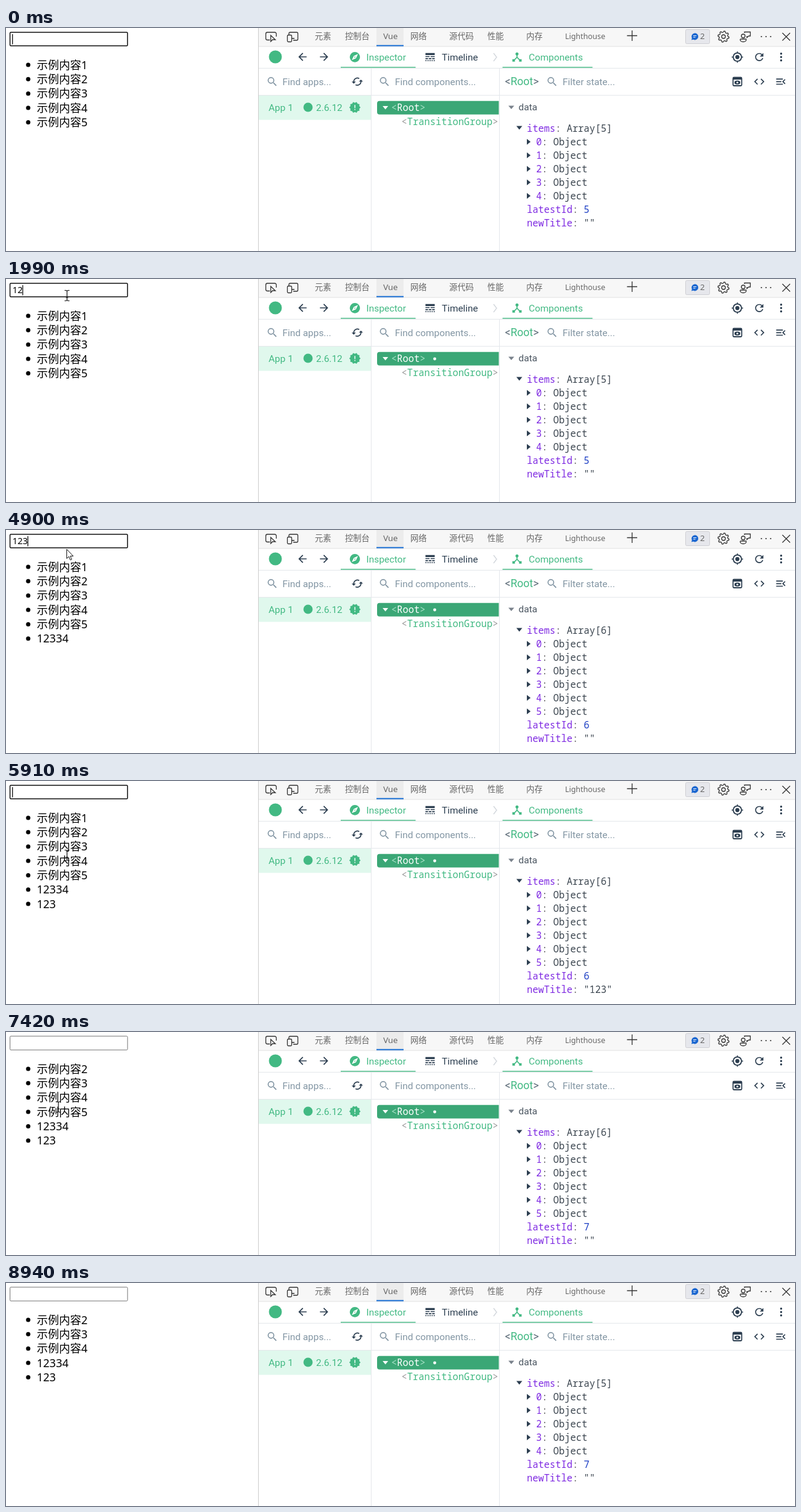
Recreate the animation shown at these times as an HTML page. Size 1280 by 363 pixels, loop 9.05 s.

```html
<!DOCTYPE html>
<html lang="zh">
<head>
<meta charset="utf-8">
<title>List transition</title>
<style>
html, body { margin: 0; width: 100%; height: 100%; overflow: hidden; background: #fff; }
svg { display: block; }
text { font-family: Roboto, sans-serif; font-size: 15.4px; }
.ui text { font-family: "Noto Sans", "Noto Sans CJK SC", sans-serif; font-size: 13.3px; fill: #666; }
.page text { font-family: "Noto Sans", "Noto Sans CJK SC", sans-serif; font-size: 18px; }
.page #typed { font-size: 14.5px; }
.mono text { font-family: "Noto Sans Mono", monospace; }
.line { fill: none; stroke: #333; stroke-width: 1.3; }
.key { fill: #7f2be2; }
.dim { fill: #666; }
</style>
</head>
<body>
<svg id="stage" width="1280" height="363" viewBox="0 0 1280 363">
  <g class="page">
    <rect id="field" fill="#fff" rx="1.5"/>
    <text id="typed" x="10.5" y="22.8"></text>
    <rect id="caret" y="10" width="1.2" height="16.5"/>
    <g id="list"></g>
  </g>

  <rect x="409" width="871" height="363" fill="#fff"/>
  <rect x="409" width="871" height="30" fill="#f7f7f7"/>
  <rect x="601" width="44" height="30" fill="#ececec"/>
  <path d="M409 30H1280" stroke="#e0e0e0"/>
  <path d="M409.5 0V363" stroke="#ccc"/>
  <path d="M410 65.5H1280M410 109.5H1280M592.5 66V363M800.5 66V363" stroke="#e4e7eb"/>
  <rect x="601" y="27.7" width="44" height="2" fill="#1a6fd4"/>
  <path d="M543 64H664.5M805.500 64H951.500" stroke="#7acda7" stroke-width="2.2"/>
  <rect x="410" y="110" width="182" height="39.5" fill="#e0f8ed"/>
  <path d="M799.500 118.700H606a4 4 0 0 0-4 4V136.700a4 4 0 0 0 4 4H799.500z" fill="#3ba776"/>

  <g class="ui" id="tabs">
    <path class="line" d="M428 19.500H424a2.500 2.500 0 0 1-2.500-2.500V9.500a2.500 2.500 0 0 1 2.500-2.500H436a2.500 2.500 0 0 1 2.500 2.500V14M429.500 12V22L432.500 19H437z"/>
    <path class="line" d="M459 12V9a2 2 0 0 1 2-2H471.500a2 2 0 0 1 2 2V18a2 2 0 0 1-2 2H466M464 17H468"/>
    <rect class="line" x="456.500" y="11.500" width="7" height="11" rx="1.500"/>
    <path class="line" d="M1007.500 12.500H1024M1015.700 4V21"/>
    <rect x="1102.500" y="2.500" width="39" height="23" rx="2" fill="#e6e7ec" stroke="#cfcfd4"/>
    <path d="M1112 19.500L1112.800 16.500A5.500 5.500 0 1 1 1115 18.700z" fill="#1a66d0"/>
    <path d="M1115 12.500H1120M1115 15H1118.500" stroke="#fff"/>
    <path id="gear" class="line"/><circle class="line" cx="1164" cy="14" r="3"/>
    <circle class="line" cx="1196" cy="13" r="3"/>
    <path class="line" d="M1191 19Q1191 18 1192.500 18H1199.500Q1201 18 1201 19Q1200.500 22.500 1196 22.500T1191 19M1198 8V6.500H1207.500V13H1205L1202 15.500V13"/>
    <path d="M1225.500 14h.01M1233 14h.01M1240.500 14h.01" stroke="#333" stroke-width="2.200" stroke-linecap="round"/>
    <path class="line" d="M1259.500 8L1272 20.500M1272 8L1259.500 20.500"/>
  </g>

  <g id="tools">
    <circle cx="437" cy="47" r="10.500" fill="#42b983"/>
    <circle cx="490" cy="129" r="7.500" fill="#42b983"/>
    <path d="M791 41L796 47.500L791 54" fill="none" stroke="#d0d5da" stroke-width="1.300"/>
    <path d="M1257.500 41.800h.01M1257.500 47.300h.01M1257.500 52.800h.01" stroke="#2c3e50" stroke-width="3.400" stroke-linecap="round"/>
    <rect x="1179.500" y="80.500" width="14" height="13.500" rx="1.500" fill="none" stroke="#2c3e50" stroke-width="1.800"/>
    <path d="M1179 82.500H1194" stroke="#2c3e50" stroke-width="3"/>
    <ellipse cx="1186.500" cy="88.700" rx="4.700" ry="3.200" fill="#2c3e50"/>
    <circle cx="1186.500" cy="88.700" r="1.500" fill="#fff"/>
    <path d="M611 127h9l-4.500 5.500z" fill="#fff"/>
    <path d="M815 126.500h9.500l-4.750 5.500z" fill="#7a828c"/>
    <path d="M828 159.500h9.500l-4.750 6z" fill="#2c3e50"/>
  </g>

  <g class="mono">
    <text x="625" y="135.200" fill="#a9e2c8">&lt;<tspan fill="#fff" font-weight="500">Root</tspan>&gt;</text>
    <text x="641.500" y="157.800" fill="#999">&lt;<tspan fill="#42b983">TransitionGroup</tspan>&gt;</text>
    <circle id="dot" cx="695.500" cy="130" r="2.400" fill="#fff"/>
    <g id="data"></g>
  </g>

  <path id="beam" d="M-4 -8.500H-1.500L0 -7.500L1.500 -8.500H4M0 -7.500V7.500M-4 8.500H-1.500L0 7.500L1.500 8.500H4M-2 3H2" fill="none" stroke="#111" stroke-width="1.200"/>
  <path id="arrow" d="M.5 .5V15.500L4 12.300L6.300 18L8.600 17L6.300 11.600H11z" fill="#fff" stroke="#111"/>
</svg>

<script>
const LOOP = 9050, PITCH = 23.35, MOVE = 500;
const $ = id => document.getElementById(id);
const esc = s => s.replace(/</g, '&lt;').replace(/>/g, '&gt;');
const label = (x, y, s, fill = '#2c3e50', more = '') =>
  `<text x="${x}" y="${y}" fill="${fill}" ${more}>${esc(s)}</text>`;

// Static toolbar
const glyphs = {
  back: 'M20 11H7.83l5.59-5.59L12 4l-8 8 8 8 1.41-1.41L7.83 13H20z',
  next: 'M4 11H16.17l-5.59-5.59L12 4l8 8-8 8-1.41-1.41L16.17 13H4z',
  search: 'M15.5 14h-.79l-.28-.27A6.47 6.47 0 0 0 16 9.5 6.5 6.5 0 1 0 9.5 16c1.61 0 3.09-.59 4.23-1.57l.27.28v.79l5 4.99L20.49 19zm-6 0A4.5 4.5 0 1 1 14 9.5 4.5 4.5 0 0 1 9.5 14z',
  compass: 'M12 2a10 10 0 1 0 0 20 10 10 0 0 0 0-20zm2.19 12.19L6 18l3.81-8.19L18 6zM12 10.9a1.1 1.1 0 1 1 0 2.2 1.1 1.1 0 0 1 0-2.2z',
  lines: 'M3 16h5v-2H3zm6.5 0h5v-2h-5zm6.5 0h5v-2h-5zM3 20h2v-2H3zm4 0h2v-2H7zm4 0h2v-2h-2zm4 0h2v-2h-2zm4 0h2v-2h-2zM3 12h8v-2H3zm10 0h8v-2h-8zM3 4v4h18V4z',
  hub: 'M17 16l-4-4V8.82A3 3 0 1 0 11 8.82V12l-4 4H3v5h5v-3.05l4-4.2 4 4.2V21h5v-5z',
  seal: 'M23 12l-2.44-2.78.34-3.68-3.61-.82-1.89-3.18L12 3 8.6 1.54 6.71 4.72l-3.61.81.34 3.68L1 12l2.44 2.78-.34 3.69 3.61.82 1.89 3.18L12 21l3.4 1.46 1.89-3.18 3.61-.82-.34-3.68zm-10 5h-2v-2h2zm0-4h-2V7h2z',
  target: 'M12 8a4 4 0 1 0 0 8 4 4 0 0 0 0-8zm8.94 3A9 9 0 0 0 13 3.06V1h-2v2.06A9 9 0 0 0 3.06 11H1v2h2.06A9 9 0 0 0 11 20.94V23h2v-2.06A9 9 0 0 0 20.94 13H23v-2zM12 19a7 7 0 1 1 0-14 7 7 0 0 1 0 14z',
  reload: 'M17.65 6.35C16.2 4.9 14.21 4 12 4a8 8 0 0 0 0 16c3.73 0 6.84-2.55 7.73-6h-2.08A6 6 0 0 1 12 18a6 6 0 1 1 0-12c1.66 0 3.14.69 4.22 1.78L13 11h7V4z',
  sync: 'M19 8l-4 4h3a6 6 0 0 1-8.8 5.25l-1.46 1.46A8 8 0 0 0 20 12h3zM6 12a6 6 0 0 1 8.8-5.25l1.46-1.46A8 8 0 0 0 4 12H1l4 4 4-4z',
  code: 'M9.4 16.6L4.8 12l4.6-4.6L8 6l-6 6 6 6zm5.2 0l4.6-4.6-4.6-4.6L16 6l6 6-6 6z',
  menu: 'M3 18h13v-2H3zm0-5h10v-2H3zm0-7v2h13V6zm18 9.59L17.42 12 21 8.41 19.59 7l-5 5 5 5z'
};
const icon = (name, x, y, fill = '#2c3e50', size = 20) =>
  `<path d="${glyphs[name]}" fill="${fill}" fill-rule="evenodd" transform="translate(${x} ${y}) scale(${size / 24}) translate(-12 -12)"/>`;

const star = (cx, cy, n, a, b) => 'M' + Array.from({length: n * 4}, (_, i) => {
  const r = i % 4 < 2 ? a : b, w = (i + .5) * Math.PI / n / 2;
  return `${cx + r * Math.sin(w)} ${cy - r * Math.cos(w)}`;
}).join('L') + 'z';
$('gear').setAttribute('d', star(1164, 14, 8, 9, 7));

const green = '#42b983', gray = '#8295a3';
$('tabs').innerHTML += [
  [501, '元素'], [550, '控制台'], [612, 'Vue'], [656, '网络'], [719, '源代码'],
  [781, '性能'], [844, '内存'], [1126, '2']
].map(([x, s]) => label(x, 18.3, s)).join('') + label(907, 18.3, 'Lighthouse', '#666', 'style="font-size:12.4px"');

$('tools').innerHTML +=
  icon('back', 481, 47) + icon('next', 516, 47) + icon('compass', 566, 47.3) .replace('#2c3e50', green) +
  icon('lines', 688, 47.3) + icon('hub', 829, 47.3, green) + icon('seal', 566, 129.3, green) +
  icon('target', 1186.5, 47.3) + icon('reload', 1222, 47.3) +
  [432, 614, 886].map(x => icon('search', x, 87.3, gray)).join('') +
  icon('sync', 570, 87.3) + icon('code', 1222, 87.3) + icon('menu', 1257, 87.3) +
  label(584.5, 52.8, 'Inspector', green) + label(707, 52.8, 'Timeline') + label(848, 52.8, 'Components', green) +
  label(448.5, 92.8, 'Find apps...', gray) + label(631, 92.8, 'Find components...', gray) + label(903, 92.8, 'Filter state...', gray) +
  label(426, 134.6, 'App 1', green) + label(503, 134.6, '2.6.12', green) + label(831.5, 134.3, 'data', '#4b5661') +
  `<text x="809.5" y="93.3" fill="#606f7b" style="font-size:17.6px">&lt;<tspan fill="${green}">Root</tspan>&gt;</text>`;

// Timeline
const at = (steps, t) => steps.filter(s => s[0] <= t).pop();
const typing = [[0, ''], [1790, '1'], [1980, '12'], [2190, '123'], [2290, '1233'], [2490, '12334'],
  [3090, ''], [4490, '1'], [4700, '123'], [5400, '']];
const states = [[0, 5, 5, ''], [2990, 5, 5, '12334'], [3580, 6, 6, ''], [5200, 6, 6, '123'],
  [6010, 7, 7, ''], [7320, 6, 7, ''], [8230, 5, 7, '']];
const path = [[100, 388, 246], [980, 99, 27], [3690, 99, 27], [3790, 99, 32], [4890, 98, 31], [4990, 99, 27],
  [5400, 99, 27], [5900, 99, 121], [6310, 99, 121], [6800, 97, 70], [7120, 97, 70], [7410, 85, 122],
  [7950, 85, 122], [8350, 300, 375]];
const rows = [
  ...[1, 2, 3, 4, 5].map(n => ({name: '示例内容' + n, enter: -MOVE, leave: Infinity})),
  {name: '12334', enter: 3080, leave: Infinity}, {name: '123', enter: 5400, leave: Infinity}
];
const blur = 6773;
rows[0].leave = blur;
rows[4].leave = 7720;

// CSS "ease": cubic-bezier(.25, .1, .25, 1)
function ease(x) {
  if (x <= 0) return 0;
  if (x >= 1) return 1;
  const bez = (a, b, u) => 3 * a * u * (1 - u) ** 2 + 3 * b * u * u * (1 - u) + u ** 3;
  let lo = 0, hi = 1;
  for (let i = 0; i < 20; i++) {
    const mid = (lo + hi) / 2;
    if (bez(.25, .25, mid) < x) lo = mid; else hi = mid;
  }
  return bez(.1, 1, lo);
}

function drawInput(t) {
  const focus = t < blur, text = at(typing, t)[1];
  const box = focus ? {x: 6.5, y: 7, width: 190.7, height: 22, stroke: '#101010', 'stroke-width': 1.5}
    : {x: 6.5, y: 6.8, width: 190.7, height: 22.4, stroke: '#767676', 'stroke-width': 1};
  for (const k in box) $('field').setAttribute(k, box[k]);
  $('typed').textContent = text;
  const key = at(typing.filter(s => s[1]), t);
  const on = Math.floor((t - (key ? key[0] : -20)) / 500) % 2 == 0;
  $('caret').setAttribute('x', 10 + text.length * 8.3);
  $('caret').style.display = focus && on ? '' : 'none';
}

function drawList(t) {
  let lift = 0;
  $('list').innerHTML = rows.map((r, i) => {
    const p = ease((t - r.enter) / MOVE), q = ease((t - r.leave) / MOVE);
    const x = 100 * (1 - p + q), y = (i - lift) * PITCH;
    lift += q;
    return p * q == 1 || !p ? '' : `<g transform="translate(${x} ${y})" opacity="${p * (1 - q)}">
      <circle cx="36" cy="60" r="3.5"/>${label(50, 66.6, r.name, '#000')}</g>`;
  }).join('');
}

let shown;
function drawData(t) {
  const state = at(states, t);
  if (state == shown) return;
  shown = state;
  const [, n, id, title] = state, step = 22;
  let y = 169.4;
  const pair = (x, key, value, fill = '#3c4650') =>
    `<text x="${x}" y="${y}"><tspan class="key">${key}</tspan><tspan class="dim">: </tspan><tspan fill="${fill}">${value}</tspan></text>`;
  let out = pair(845, 'items', `Array[${n}]`);
  for (let i = 0; i < n; i++) {
    y += step;
    out += `<path d="M845 ${y - 11}v9.5l6-4.75z" fill="#2c3e50"/>` + pair(860, i, 'Object');
  }
  y += step;
  out += pair(845, 'latestId', id, '#1d3fc4');
  y += step;
  $('data').innerHTML = out + pair(845, 'newTitle', `"${title}"`);
}

function drawPointer(t) {
  let x = -50, y = -50;
  const i = path.findIndex(p => p[0] > t);
  if (i > 0) {
    const [t0, x0, y0] = path[i - 1], [t1, x1, y1] = path[i];
    const u = (t - t0) / (t1 - t0), s = u * u * (3 - 2 * u);
    x = x0 + (x1 - x0) * s;
    y = y0 + (y1 - y0) * s;
  } else if (t >= 8830 && t < 8935) [x, y] = [1001, 357];
  const overText = x > 6 && x < 198 && y > 6 && y < 30 || x > 49 && x < 131 && y > 50 && y < 210;
  for (const id of ['beam', 'arrow']) {
    $(id).setAttribute('transform', `translate(${x} ${y})`);
    $(id).style.display = overText == (id == 'beam') ? '' : 'none';
  }
}

const start = performance.now();
function draw() {
  const t = (performance.now() - start) % LOOP;
  drawInput(t);
  drawList(t);
  drawData(t);
  drawPointer(t);
  $('dot').style.display = t < 1790 ? 'none' : '';
  requestAnimationFrame(draw);
}
draw();
</script>
</body>
</html>
```
